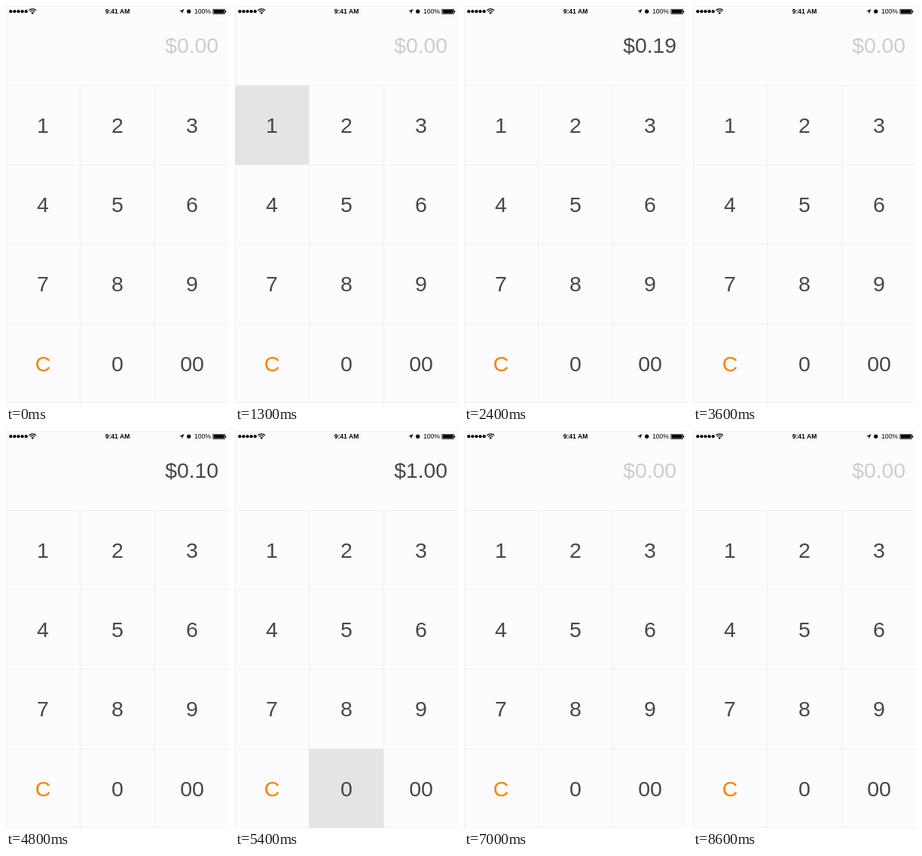
Recreate the animation shown at these times as an HTML page with a canvas. Size 296x526 px, loop 8.8 s.

```html
<!DOCTYPE html>
<html lang="en">
<head>
<meta charset="utf-8">
<title>Keypad</title>
<style>
  html, body { margin: 0; width: 100%; height: 100%; overflow: hidden; background: #fcfcfe; }
  canvas { display: block; }
</style>
</head>
<body>
<canvas id="stage" width="296" height="526"></canvas>
<script>
const ctx = document.getElementById('stage').getContext('2d');
const W = 296, H = 526, LOOP = 8800;
const SANS = '"Liberation Sans", Arial, sans-serif';
const PAPER = '#fcfcfe', LINE = '#f0f0f2', PRESSED = '#e4e4e6';
const INK = '#48484a', PALE = '#cdcdcf', ORANGE = '#ff8000';
const KEYS = ['1', '2', '3', '4', '5', '6', '7', '8', '9', 'C', '0', '00'];
const colX = [0, 98, 197, W], rowY = [105, 210, 315, 421, H];

// Each tap: key, press time, release time, time the amount changes
const TAPS = [
  ['1', 1300, 1500, 1600],
  ['9', 1900, 2000, 2000],
  ['9', 2300, 2400, 2500],
  ['C', 3500, 3500, 3500],
  ['1', 4100, 4300, 4300],
  ['0', 4600, 4800, 4800],
  ['0', 5100, 5300, 5300],
  ['0', 5400, 5600, 5600],
  ['0', 5700, 5900, 6000],
  ['0', 6200, 6400, 6400],
  ['0', 6500, 6700, 6700],
  ['C', 6800, 7000, 7000]
].map(([key, down, up, commit]) => ({ key, down, up, commit }));

function centsAt(t) {
  return TAPS.filter(tap => t >= tap.commit)
    .reduce((sum, { key }) => key === 'C' ? 0 : sum * 10 + Number(key), 0);
}

function formatMoney(cents) {
  const whole = String(Math.floor(cents / 100)).replace(/\B(?=(\d{3})+$)/g, ',');
  return '$' + whole + '.' + String(cents % 100).padStart(2, '0');
}

function text(str, x, y, font, color, align = 'center') {
  ctx.font = `${font} ${SANS}`;
  ctx.fillStyle = color;
  ctx.textAlign = align;
  ctx.fillText(str, x, y);
}

function dot(x, y, r) {
  ctx.beginPath();
  ctx.arc(x, y, r, 0, Math.PI * 2);
  ctx.fill();
}

function polygon(points) {
  ctx.beginPath();
  points.forEach(([x, y]) => ctx.lineTo(x, y));
  ctx.fill();
}

function drawStatusBar() {
  ctx.fillStyle = ctx.strokeStyle = '#000';
  for (let i = 0; i < 5; i++) dot(6.3 + i * 5.1, 7.2, 2.1);

  ctx.lineWidth = 1.3;
  for (const r of [4.2, 6.8]) {
    ctx.beginPath();
    ctx.arc(35.2, 10.6, r, -Math.PI * 0.75, -Math.PI * 0.25);
    ctx.stroke();
  }
  polygon([[35.2, 10.9], [33.4, 8.9], [35.2, 8.1], [37, 8.9]]);

  text('9:41 AM', 148, 10.2, 'bold 8.5px', '#000');
  polygon([[236.5, 4], [233.6, 10.4], [233.2, 7.3], [230, 6.9]]);
  dot(242.7, 7.2, 2.6);
  text('100%', 250, 10.2, '8.6px', '#000', 'left');

  ctx.lineWidth = 0.7;
  ctx.strokeRect(274.8, 4.3, 15.6, 6.2);
  ctx.fillRect(275.6, 5.1, 14, 4.6);
  ctx.fillRect(291, 6.2, 1.2, 2.4);
}

function drawGrid() {
  ctx.fillStyle = LINE;
  for (const y of [0, ...rowY.slice(0, 4), H - 1]) ctx.fillRect(0, y, W, 1);
  ctx.fillRect(0, 0, 1, H);
  for (const x of [98, 197]) ctx.fillRect(x, 105, 1, H - 105);
}

function drawKeys(pressed) {
  KEYS.forEach((key, i) => {
    const col = i % 3, row = Math.floor(i / 3);
    if (key === pressed) {
      ctx.fillStyle = PRESSED;
      ctx.fillRect(colX[col], rowY[row], colX[col + 1] - colX[col], rowY[row + 1] - rowY[row]);
    }
    text(key, 49 + col * 99, 167.8 + row * 105.3, '28.5px', key === 'C' ? ORANGE : INK);
  });
}

function draw(t) {
  const cents = centsAt(t);
  const active = TAPS.find(tap => t >= tap.down && t < tap.up);
  ctx.fillStyle = PAPER;
  ctx.fillRect(0, 0, W, H);
  drawGrid();
  drawKeys(active && active.key);
  text(formatMoney(cents), 282, 62, '28.3px', cents ? INK : PALE, 'right');
  drawStatusBar();
}

const start = performance.now();
function tick() {
  draw((performance.now() - start) % LOOP);
  requestAnimationFrame(tick);
}
tick();
</script>
</body>
</html>
```
